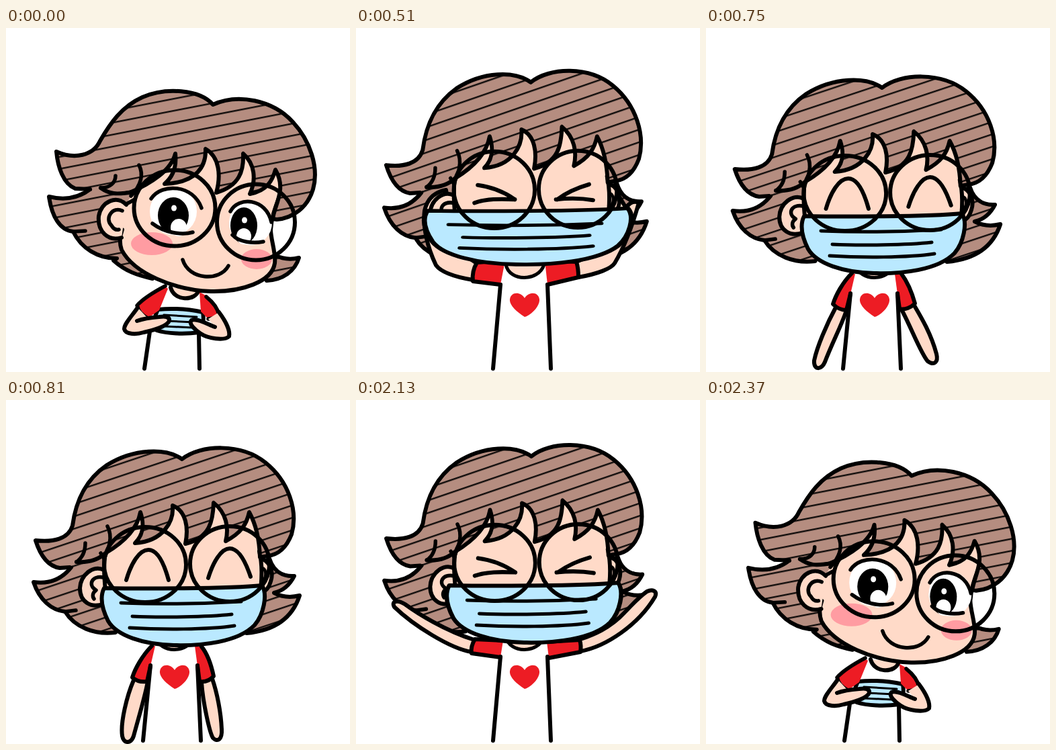
Write an HTML page that moves like this. It is 512x512 px and loops after 2430 ms.

```html
<!DOCTYPE html>
<html lang="en">
<head>
<meta charset="utf-8">
<title>Putting on a mask</title>
<style>
html, body { margin: 0; width: 100%; height: 100%; overflow: hidden; background: #fff; }
svg { display: block; width: 100vw; height: 100vh; }
.pose { display: none; }
.pose.on { display: inline; }
</style>
</head>
<body>
<svg id="stage" viewBox="0 0 512 512" stroke-linecap="round" stroke-linejoin="round"></svg>
<script>
const LOOP = 2430;
const INK = '#000', SKIN = '#ffdac8', RED = '#ed1c24', BLUE = '#bae9ff', PINK = '#ff9ca2', BROWN = '#b58d80';

const fill = (d, c) => `<path d="${d}" fill="${c}"/>`;
const line = (d, w = 5.5) => `<path d="${d}" fill="none" stroke="${INK}" stroke-width="${w}"/>`;
// Outline stays open; "rest" only completes the filled area.
const shape = (d, c, rest = '', w = 6) => fill(d + rest, c) + line(d, w);
const oval = (x, y, rx, ry, c) => `<ellipse cx="${x}" cy="${y}" rx="${rx}" ry="${ry}" fill="${c}"/>`;
const ring = (x, y, rx, ry) => `<ellipse cx="${x}" cy="${y}" rx="${rx}" ry="${ry}" fill="none" stroke="${INK}" stroke-width="6"/>`;
const group = (m, s) => `<g transform="${m}">${s}</g>`;

const stripes = (id, angle, gap, shift) => `<pattern id="${id}" width="600" height="${gap}" patternUnits="userSpaceOnUse"
  patternTransform="translate(0 ${shift}) rotate(${angle})"><rect width="600" height="${gap}" fill="${BROWN}"/>
  <rect y="8" width="600" height="2.2"/></pattern>`;
const defs = `<defs>${stripes('hairFront', -18.5, 17.5, 13)}${stripes('hairTilt', -11, 17.5, 2)}</defs>`;

// ---- head facing front
const front = {
  back: shape('M97 249 C82 268 62 274 41 271 C50 298 68 313 88 315 C102 338 132 350 163 346', 'url(#hairFront)', 'L200 340 L190 215 L110 215Z')
    + line('M88 315 L104 313')
    + shape('M392 236 C398 255 412 263 429 262 C422 276 412 284 399 287 C412 294 425 294 437 291 C427 322 402 343 358 347', 'url(#hairFront)', 'L340 300 L360 236Z'),
  face: shape('M146 253 C130 245 111 260 110 280 C110 300 126 311 146 303', SKIN)
    + line('M145 264 C128 261 121 275 134 283 C129 287 128 292 131 296')
    + shape('M378 236 C392 238 399 255 394 270 C391 281 386 285 380 287', SKIN)
    + line('M381 250 C388 252 388 264 382 270', 4.5)
    + shape('M148 226 C144 250 146 300 160 325 C180 357 330 361 365 325 C382 300 383 250 377 225', SKIN, 'L377 150 L195 150Z'),
  hair: shape('M95 249 L80 250 C60 247 50 228 44 209 C70 212 93 207 99 187 C104 150 118 119 150 97 '
      + 'C190 72 238 71 262 88 C290 66 350 64 386 93 C421 121 435 165 425 200 C418 218 406 230 390 232 '
      + 'L378 234 C377 205 372 185 362 167 C358 185 350 198 327 210 C332 190 328 168 309 153 '
      + 'C308 180 304 205 267 214 C272 190 268 165 248 157 C250 180 235 210 192 213 '
      + 'C205 200 206 185 200 167 C195 195 170 215 148 228 C135 240 120 242 105 241', 'url(#hairFront)')
    + line('M118 213 C118 228 112 236 105 241') + line('M151 188 C160 205 152 222 146 236'),
  glasses: ring(207, 245, 61, 56) + ring(333, 244, 59, 56) + line('M146 236 L141 228M388 238 L397 250'),
  happy: line('M179 268 C186 244 198 223 212 223 C227 223 236 246 242 268M301 265 C308 242 320 221 333 221 C347 221 357 242 364 263', 6),
  squint: line('M182 238 C205 241 222 248 238 259M177 264 C195 258 215 258 238 259M350 237 C332 242 316 249 302 259M300 259 C318 257 338 257 356 260', 6)
};

const mask = shape('M146 280 C200 281 330 281 381 276 C390 290 383 320 370 335 C345 361 290 366 250 365 '
    + 'C205 364 165 351 152 329 C140 305 141 290 146 280Z', BLUE)
  + line('M171 302 C230 304 300 303 350 300M188 322 C230 324 300 323 336 319M184 339 C230 342 300 342 340 336', 5);

// ---- arms: [left sleeve, left arm, right sleeve, right arm]
const halfSleeve = 'M217 366 C203 372 190 382 183 392 L203 415 L217 392';
const halfArm = 'M186 394 C160 420 130 440 112 452 C101 463 112 473 124 466 C150 455 180 435 202 414';
const flip = d => d.replace(/(\d+) (\d+)/g, (_, x, y) => `${499 - x} ${y}`);
const arms = {
  down: ['M217 366 C203 380 192 400 188 413 C195 419 203 420 210 419 L215 396',
    'M190 417 C180 440 170 480 173 500 C175 512 186 512 190 500 C198 470 206 445 211 419',
    'M291 367 C300 378 305 392 309 411 C304 417 296 420 288 419 L285 396',
    'M291 420 C293 450 303 495 308 503 C315 510 322 505 321 490 C320 465 314 435 307 415'],
  loose: ['M217 365 C203 379 193 398 189 411 C196 418 203 420 209 420 L215 396',
    'M193 416 C180 440 165 475 161 495 C160 510 172 509 177 497 C188 468 203 440 209 420',
    'M291 366 C300 378 306 392 311 410 C305 416 296 420 288 418 L285 396',
    'M291 419 C305 445 320 485 330 496 C340 503 346 497 343 485 C335 455 320 430 310 413'],
  half: [halfSleeve, halfArm, flip(halfSleeve), flip(halfArm)],
  wide: ['M219 358 L177 356 C172 364 171 371 172 377 L215 383',
    'M172 375 C140 370 85 335 57 308 C52 299 62 297 73 304 C92 318 132 343 176 357',
    'M284 360 L333 357 C335 364 335 369 334 375 L287 384',
    'M334 374 C372 367 420 335 445 293 C449 284 441 281 433 285 C420 294 412 304 400 316 C378 340 352 350 334 356'],
  ears: ['M222 346 L180 349 C174 359 173 369 174 377 L215 382',
    'M174 375 C150 371 127 364 119 353 C106 326 99 295 102 272 C106 254 118 244 134 241 L150 330 L178 349',
    'M281 346 L328 348 C331 357 331 365 331 371 L285 382',
    'M331 371 C360 366 380 358 385 350 C400 325 412 292 421 260 C412 256 406 261 402 268 L390 248 L370 330 L328 348']
};
const heart = fill('M251 430 C238 422 228 412 229 404 C230 393 244 391 251 402 C258 391 272 393 273 404 C274 413 262 427 251 430Z', RED);

function body([ls, la, rs, ra], up) {
  const top = up ? 382 : 395;
  return fill('M219 350 L215 395 L204 508 H290 L285 395 L283 350Z', '#fff')
    + shape(la, SKIN) + shape(ra, SKIN)
    + shape(ls, RED, up ? 'Z' : 'L222 366Z') + shape(rs, RED, up ? 'Z' : 'L281 366Z')
    + shape('M223 352 C228 378 272 378 280 352', SKIN, 'Z', 5)
    + line(`M215 ${top} L204 507M285 ${top} L290 507`, 6) + heart;
}

function facing(armSet, eyes, headMove, maskMove) {
  const f = front, up = armSet === 'wide' || armSet === 'ears';
  return group(headMove, f.back) + body(arms[armSet], up)
    + group(headMove, f.face + f.hair + f[eyes])
    + group(maskMove, mask) + group(headMove, f.glasses);
}

// ---- head tilted, looking at the mask in the hands
const eye = (x, y, rx, ry, hx, hy, hr, sx, sy) =>
  oval(x, y, rx, ry, INK) + oval(hx, hy, hr, hr + 1, '#fff') + oval(sx, sy, 4, 4.5, '#fff');
const tilt = {
  back: shape('M125 240 C108 253 88 257 64 251 C68 280 80 301 100 303 C112 328 137 343 165 343 L160 346 C178 362 195 368 218 373', 'url(#hairTilt)', 'L230 250 L150 220Z')
    + line('M100 303 L118 302')
    + shape('M400 338 C412 344 424 345 436 342 C430 362 412 375 388 376', 'url(#hairTilt)', 'L385 345Z'),
  face: shape('M412 232 C410 250 396 270 394 300 C394 315 402 335 400 350 C396 378 350 393 305 392 C250 390 190 365 172 330 C168 318 170 308 173 300', SKIN, 'L178 262 L245 170 L405 180Z')
    + shape('M179 263 C165 248 142 258 138 280 C136 303 152 318 172 312', SKIN)
    + line('M173 272 C159 265 146 283 157 294 C160 299 164 301 168 300')
    + oval(217, 321, 31, 17, PINK) + oval(373, 344, 23, 15, PINK)
    + line('M263 345 C272 375 318 378 331 354'),
  hair: shape('M125 240 L103 239 C85 232 77 206 75 184 C102 196 130 190 140 168 C155 142 172 117 203 103 '
      + 'C237 88 288 91 308 114 C345 97 397 107 427 140 C453 168 466 208 457 240 C449 267 427 283 403 285 '
      + 'L397 284 C400 262 418 240 401 211 C397 225 390 242 363 247 C373 225 370 202 353 187 '
      + 'C354 212 348 235 313 245 C320 220 318 192 297 180 C298 205 285 230 236 232 '
      + 'C250 220 254 205 252 187 C246 212 215 232 184 245 C170 246 158 250 141 238', 'url(#hairTilt)')
    + line('M163 220 C163 230 155 238 141 238') + line('M198 204 C206 220 200 235 186 250'),
  glasses: ring(251, 268, 60.5, 56.5) + ring(372, 289, 58, 56.5) + line('M190 256 L179 262'),
  open: oval(249, 273, 35, 35, '#fff') + oval(364, 290, 32, 33, '#fff')
    + eye(249, 279, 23, 27, 257, 297, 12, 250, 268) + eye(354, 294, 20, 27, 354, 310, 11, 355, 286)
    + line('M216 254 C232 230 279 233 291 268M218 291 C235 304 260 309 278 304M334 273 C346 250 387 253 395 289M337 308 C347 319 368 321 383 318'),
  squint: line('M225 262 C250 263 276 278 288 302M219 291 C242 281 266 286 288 302M387 300 C368 294 346 298 332 311M332 311 C354 307 378 313 389 325')
};

const holding = fill('M236 383 L214 420 L214 452 L206 508 H288 L287 455 L300 420 L288 388Z', '#fff')
  + line('M214 452 L206 507M287 455 L288 507', 6)
  + shape('M245 386 C250 407 282 407 287 390', SKIN)
  + shape('M226 419 C245 417 270 418 293 423 C295 435 293 448 288 453 C265 456 240 455 224 450 C220 440 221 428 226 419Z', BLUE)
  + line('M235 427 L284 430M240 436 L280 438M236 444 L278 446', 3)
  + fill('M236 384 L195 413 L211 432 L228 420 L241 388Z', RED)
  + fill('M288 393 L290 422 L302 434 L318 428 C318 416 308 405 299 399Z', RED)
  + line('M237 384 C218 394 203 404 195 413 C197 421 203 428 211 432M298 400 C308 408 315 417 317 427 C312 431 307 433 301 433')
  + shape('M196 416 C188 428 176 440 176 448 C178 457 195 456 205 453 C220 450 239 444 243 436 C244 429 236 429 228 430 C215 431 203 433 195 436', SKIN, 'L211 432Z')
  + shape('M317 423 C326 435 334 450 332 459 C325 466 300 462 290 455 C282 450 271 440 276 435 C284 431 300 441 311 445', SKIN, 'L301 433Z');

const leaning = (eyes, move) => group(move, tilt.back) + holding
  + group(move, tilt.face + tilt[eyes] + tilt.hair + tilt.glasses);

// ---- timeline
const STILL = 'translate(0 0)';
const RISE = 'matrix(.987 0 0 1.02 1.5 -9)';
const WIDER = 'matrix(1.013 0 0 1 -3.3 0)';
const LIFT = 'matrix(.993 0 0 1 1.7 -2)';
const STRETCHED = 'matrix(1.27 0 0 .94 -79.3 8.8)';
const LOOSE = 'matrix(1.07 0 0 1 -17.5 1)';

const steps = [
  [0, leaning('open', STILL)],
  [360, leaning('squint', 'matrix(1.032 .033 -.036 .968 6.2 12.4)')],
  [450, leaning('squint', 'matrix(1.01 .01 -.012 .99 2 4)')],
  [510, facing('ears', 'squint', RISE, STRETCHED)],
  [570, facing('ears', 'squint', 'matrix(1 0 0 1.01 0 -4)', 'matrix(1.15 0 0 .97 -39 5)')],
  [630, facing('wide', 'squint', WIDER, LOOSE)],
  [690, facing('half', 'squint', WIDER, 'matrix(1.03 0 0 1 -8 0)')],
  [750, facing('loose', 'happy', 'matrix(1.006 0 0 1 -1.5 1)', STILL)],
  [810, facing('down', 'happy', STILL, STILL)],
  [1980, facing('loose', 'happy', LIFT, 'translate(0 -1.5)')],
  [2040, facing('half', 'happy', LIFT, 'translate(0 -2)')],
  [2130, facing('wide', 'squint', 'matrix(.99 0 0 1.01 1.5 -5)', 'matrix(1.07 0 0 1 -17.5 -4)')],
  [2220, facing('ears', 'squint', RISE, STRETCHED)],
  [2310, leaning('squint', 'translate(-3 -4)')],
  [2370, leaning('open', 'matrix(1 0 .008 1 -3 -1.2)')]
];

const stage = document.getElementById('stage');
stage.innerHTML = defs + steps.map(([, art]) => `<g class="pose">${art}</g>`).join('');
const poses = [...stage.querySelectorAll('.pose')];
const start = performance.now();
let shown = -1;

function draw() {
  const t = (performance.now() - start) % LOOP;
  const now = steps.findLastIndex(([at]) => at <= t);
  if (now !== shown) {
    poses.forEach((p, i) => p.classList.toggle('on', i === now));
    shown = now;
  }
  requestAnimationFrame(draw);
}
draw();
</script>
</body>
</html>
```
